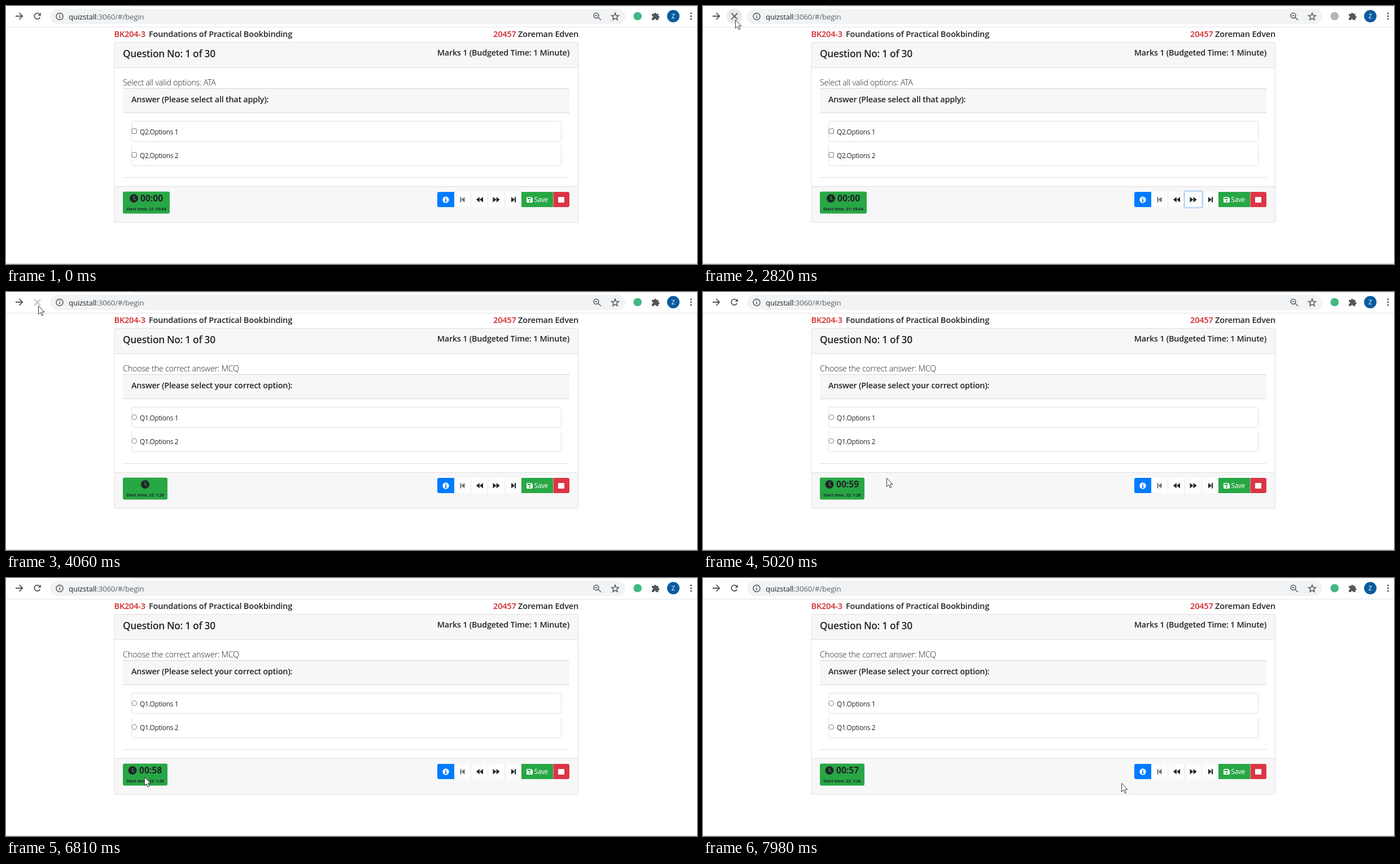
Recreate the animation shown at these times as an HTML page. Size 1224 px wide and 458 px high, loop 8000 ms.

```html
<!DOCTYPE html>
<html lang="en">
<head>
<meta charset="utf-8">
<title>Quiz page</title>
<style>
html, body { margin: 0; width: 100%; height: 100%; overflow: hidden; background: #fff; }
svg { display: block; width: 1224px; height: 458px; font-family: "Open Sans", "Noto Sans", sans-serif; }
text { fill: #212529; white-space: pre; }
.semi { font-weight: 600; font-size: 14.4px; letter-spacing: -.016em; }
.bar { font-size: 14.6px; }
.big { font-size: 17.3px; }
.red { fill: #d3262b; }
.light { font-weight: 300; font-size: 14.5px; letter-spacing: -.02em; }
.opt { font-size: 11.8px; letter-spacing: -.025em; }
.count { font-weight: 700; font-size: 15.6px; }
.start { font-weight: 700; font-size: 7.2px; }
.end { text-anchor: end; }
.line { fill: none; stroke: #dfdfdf; }
.shade { fill: #f7f7f7; }
.tool { fill: none; stroke: #54585c; stroke-width: 1.8; }
.box { fill: #fff; stroke: #767676; }

/* One loop is 8 s, so 1% is 80 ms */
.t { animation: 8s step-end infinite; }
#page { animation-name: page; }
#old { animation-name: old; }
#new { animation-name: new; }
#ring { animation-name: ring; }
#hover { animation-name: hover; }
#reload { animation-name: reload; }
#stop { animation-name: stop; }
#badge { animation-name: badge; }
#idle { animation-name: idle; }
#run { animation-name: run; }
#s59 { animation-name: s59; }
#s58 { animation-name: s58; }
#s57 { animation-name: s57; }
#cursor { animation-name: cursor; }

@keyframes page { 0% { opacity: 1 } 46.875% { opacity: 0 } 50.75%, 100% { opacity: 1 } }
@keyframes old { 0% { opacity: 1 } 46.875%, 100% { opacity: 0 } }
@keyframes new { 0% { opacity: 0 } 50.75%, 100% { opacity: 1 } }
@keyframes ring { 0% { opacity: 0 } 25.75% { opacity: 1 } 46.875%, 100% { opacity: 0 } }
@keyframes hover { 0% { opacity: 0 } 28.625% { opacity: 1 } 46.875%, 100% { opacity: 0 } }
@keyframes reload { 0% { opacity: 1 } 35.25% { opacity: 0 } 46.875% { opacity: 1 } 48.875% { opacity: 0 } 58%, 100% { opacity: 1 } }
@keyframes stop { 0% { opacity: 0 } 35.25% { opacity: 1 } 46.875% { opacity: 0 } 48.875% { opacity: 1 } 50.75% { opacity: .42 } 58%, 100% { opacity: 0 } }
@keyframes badge { 0% { fill: #41b883 } 32.625% { fill: #b4b6b8 } 47.875%, 100% { fill: #41b883 } }
@keyframes idle { 0% { opacity: 1 } 62.75%, 100% { opacity: 0 } }
@keyframes run { 0% { opacity: 0 } 62.75%, 100% { opacity: 1 } }
@keyframes s59 { 0% { opacity: 1 } 75.625%, 100% { opacity: 0 } }
@keyframes s58 { 0% { opacity: 0 } 75.625% { opacity: 1 } 88.875%, 100% { opacity: 0 } }
@keyframes s57 { 0% { opacity: 0 } 88.875%, 100% { opacity: 1 } }
@keyframes cursor {
  0% { transform: translate(540px, 480px) }
  9.625% { transform: translate(528px, 444px); animation-timing-function: steps(2) }
  11.25% { transform: translate(475px, 398px) }
  14.125% { transform: translate(330px, 272px); animation-timing-function: steps(2) }
  16% { transform: translate(17px, 12px) }
  18.875% { transform: translate(-8px, -18px) }
  20% { transform: translate(52px, 30px) }
  20.875% { transform: translate(17px, 12px) }
  22.75% { transform: translate(440px, 180px); animation-timing-function: steps(2) }
  24.75% { transform: translate(868px, 341px) }
  26.75% { transform: translate(600px, 240px); animation-timing-function: steps(2) }
  28.625% { transform: translate(57px, 24px) }
  58% { transform: translate(70px, 40px); animation-timing-function: steps(5) }
  62.75% { transform: translate(325px, 330px) }
  67.5% { transform: translate(285px, 285px); animation-timing-function: steps(1) }
  68.5% { transform: translate(246px, 222px); animation-timing-function: steps(1) }
  69.5% { transform: translate(340px, 198px); animation-timing-function: steps(4) }
  73.25% { transform: translate(834px, 379px) }
  74.5% { transform: translate(780px, 404px); animation-timing-function: steps(3) }
  77.25% { transform: translate(536px, 411px) }
  78.5% { transform: translate(480px, 411px); animation-timing-function: steps(4) }
  83% { transform: translate(262px, 330px); animation-timing-function: steps(2) }
  85.125% { transform: translate(245px, 353px) }
  86% { transform: translate(248px, 346px) }
  88.875% { transform: translate(262px, 338px); animation-timing-function: steps(5) }
  94.5% { transform: translate(520px, 380px); animation-timing-function: steps(5) }
  98.875% { transform: translate(716px, 364px) }
  99.75%, 100% { transform: translate(741px, 364px) }
}
</style>
</head>
<body>
<svg viewBox="0 0 1224 458">
  <defs>
    <g id="clock">
      <circle r="7.5" fill="#212529"/>
      <path d="M0-4.5V.5L2.8 2.6" fill="none" stroke="#28a745" stroke-width="1.5"/>
    </g>
    <path id="tri" d="M0 0L6-4.7V4.7Z"/>
    <g id="step"><path d="M-4.5-4.7h2v9.4h-2z"/><use href="#tri" x="-2.5"/></g>
    <g id="wind"><use href="#tri" x="-6.2"/><use href="#tri"/></g>
  </defs>
  <rect width="1224" height="458" fill="#fff"/>

  <!-- Browser bar -->
  <path d="M222 .5H1224" stroke="#e6e8ea"/>
  <rect x="78" y="5" width="1019" height="27" rx="13.5" fill="#f1f3f4"/>
  <path d="M0 37.5H1224" stroke="#e1e3e5"/>
  <path d="M0 457.5H1224" stroke="#cfcfcf"/>
  <path class="tool" d="M17 18H29M23.5 12.2L29.3 18L23.5 23.8"/>
  <circle id="hover" class="t" cx="55.5" cy="18" r="13.5" fill="#e8e9ea"/>
  <g id="reload" class="t">
    <path class="tool" d="M60.2 20A5.2 5.2 0 1 1 59.4 14.4"/>
    <path d="M61.8 11.8V17.3H56.3Z" fill="#54585c"/>
  </g>
  <path id="stop" class="t tool" d="M50.3 12.8L61 23.6M61 12.8L50.3 23.6"/>
  <circle class="tool" cx="95" cy="18.5" r="6" style="stroke-width:1.5"/>
  <path d="M94.2 15h1.6v1.6h-1.6zM94.2 17.8h1.6v4h-1.6z" fill="#54585c"/>
  <text x="111" y="23.5" font-size="13.3" letter-spacing="-.2">quizstall<tspan fill="#5f6368">:3060/#/begin</tspan></text>
  <g class="tool" style="stroke-width:1.5">
    <circle cx="1045.5" cy="17" r="4.4"/>
    <path d="M1048.8 20.3L1054 25M1043.3 17h4.4"/>
    <path d="M1079 12.4L1080.8 16.7L1085.4 17L1081.9 20L1083 24.4L1079 22L1075 24.4L1076.1 20L1072.6 17L1077.2 16.7Z"/>
  </g>
  <circle id="badge" class="t" cx="1118.8" cy="18" r="7.3" fill="#41b883"/>
  <g fill="#54585c">
    <path d="M1144 14h3.8a2.1 2.1 0 1 1 4.2 0h3.5v3.7a2.1 2.1 0 1 1 0 4.2v3.1h-3.8a2 2 0 1 0-4 0H1144v-3.8a2 2 0 1 0 0-4z"/>
    <circle cx="1213.5" cy="13" r="1.6"/><circle cx="1213.5" cy="18" r="1.6"/><circle cx="1213.5" cy="23" r="1.6"/>
  </g>
  <circle cx="1182" cy="18" r="11" fill="#0a5ca0"/>
  <text x="1182" y="22" font-size="11" text-anchor="middle" style="fill:#fff">Z</text>

  <g id="page" class="t">
    <text class="semi bar red" x="191.5" y="55">BK204-3</text>
    <text class="semi bar" x="253" y="55">Foundations of Practical Bookbinding</text>
    <text class="semi bar end" x="1014" y="55"><tspan class="red">20457</tspan> Zoreman Edven</text>

    <!-- Card -->
    <path class="shade" d="M192 64H1014V109H192ZM192 321H1014V384H192ZM207 147H998V189H207Z"/>
    <rect class="line" x="192" y="64.5" width="821.5" height="319.5" rx="3"/>
    <path class="line" d="M192 109.5H1014M192 320.5H1014M207 304.5H998"/>
    <path class="line" d="M207 146.5H998M207 189.5H998" style="stroke:#d6d6d6"/>
    <rect class="line" x="222.5" y="204.5" width="761" height="36" rx="3"/>
    <path class="line" d="M222.5 247V280.500a3 3 0 0 0 3 3H980.500a3 3 0 0 0 3-3V247"/>
    <text class="semi big" x="207" y="91">Question No: 1 of 30</text>
    <text class="semi end" x="998" y="87.500">Marks 1 (Budgeted Time: 1 Minute)</text>

    <!-- Navigation -->
    <path d="M794 330H913V357H794Z" fill="#fdfdfd"/>
    <path class="line" d="M823.5 330V357M853.5 330V357M883.5 330V357" style="stroke:#e8e8e8"/>
    <path d="M794 330H767a3 3 0 0 0-3 3V354a3 3 0 0 0 3 3H794Z" fill="#007bff"/>
    <path d="M913 330H969V357H913Z" fill="#28a745"/>
    <path d="M969.500 330H995a3 3 0 0 1 3 3V354a3 3 0 0 1-3 3H969.500Z" fill="#dc3545"/>
    <circle cx="779" cy="344" r="5.7" fill="#fff"/>
    <path d="M778 340.500h2v1.800h-2zM777.500 343.200h2.500v3.300h.700v1.200h-3.400v-1.200h.700v-2.100h-.500z" fill="#007bff"/>
    <g fill="#212529">
      <use href="#step" transform="translate(809 343.800)" opacity=".65"/>
      <use href="#wind" transform="translate(839 343.800)"/>
      <use href="#wind" transform="translate(868.500 343.800) scale(-1 1)"/>
      <use href="#step" transform="translate(898.500 343.800) scale(-1 1)"/>
    </g>
    <path d="M923.500 339H930.500L933 341.500V347.500a1.500 1.500 0 0 1-1.500 1.500H923.500a1.500 1.500 0 0 1-1.500-1.500V340.500a1.500 1.500 0 0 1 1.500-1.500Z" fill="#fff"/>
    <path d="M923.700 340.600H929.800V343H923.700Z" fill="#28a745"/>
    <circle cx="927.500" cy="346" r="1.500" fill="#28a745"/>
    <text class="opt" x="935.500" y="348" style="fill:#fff">Save</text>
    <rect x="978" y="339" width="11" height="10" rx="1" fill="#fff"/>
    <rect id="ring" class="t" x="852.500" y="328.500" width="32.500" height="29.500" rx="2" fill="none" stroke="#b8d6f8" stroke-width="2.600"/>

    <g id="old" class="t">
      <text class="light" x="207" y="141">Select all valid options: ATA</text>
      <text class="semi" x="222" y="171">Answer (Please select all that apply):</text>
      <rect class="box" x="223" y="218" width="8.500" height="8.500" rx="1.500"/>
      <rect class="box" x="223" y="260" width="8.500" height="8.500" rx="1.500"/>
      <text class="opt" x="237" y="227.500">Q2.Options 1</text>
      <text class="opt" x="237" y="270">Q2.Options 2</text>
      <rect x="207" y="329.500" width="83" height="39" rx="3" fill="#28a745"/>
      <use href="#clock" x="226.500" y="341.500"/>
      <text class="count" x="238" y="347">00:00</text>
      <text class="start" x="213" y="363">Start time: 21: 59:44</text>
    </g>

    <g id="new" class="t">
      <text class="light" x="207" y="141">Choose the correct answer: MCQ</text>
      <text class="semi" x="222" y="171">Answer (Please select your correct option):</text>
      <circle class="box" cx="227.300" cy="222.300" r="4.400"/>
      <circle class="box" cx="227.300" cy="264.500" r="4.400"/>
      <text class="opt" x="237" y="227.500">Q1.Options 1</text>
      <text class="opt" x="237" y="270">Q1.Options 2</text>
      <rect x="207" y="329.500" width="79" height="39" rx="3" fill="#28a745"/>
      <use id="idle" class="t" href="#clock" x="246.500" y="341.500"/>
      <g id="run" class="t">
        <use href="#clock" x="224" y="341.500"/>
        <text id="s59" class="t count" x="236" y="347">00:59</text>
        <text id="s58" class="t count" x="236" y="347">00:58</text>
        <text id="s57" class="t count" x="236" y="347">00:57</text>
      </g>
      <text class="start" x="213" y="363">Start time: 22: 1:28</text>
    </g>
  </g>

  <g id="cursor" class="t">
    <path d="M.5.5V15.500L4 12.300L6.400 18L8.800 17L6.400 11.400H11Z" fill="#fff" stroke="#3a3a3a"/>
  </g>
</svg>
</body>
</html>
```
